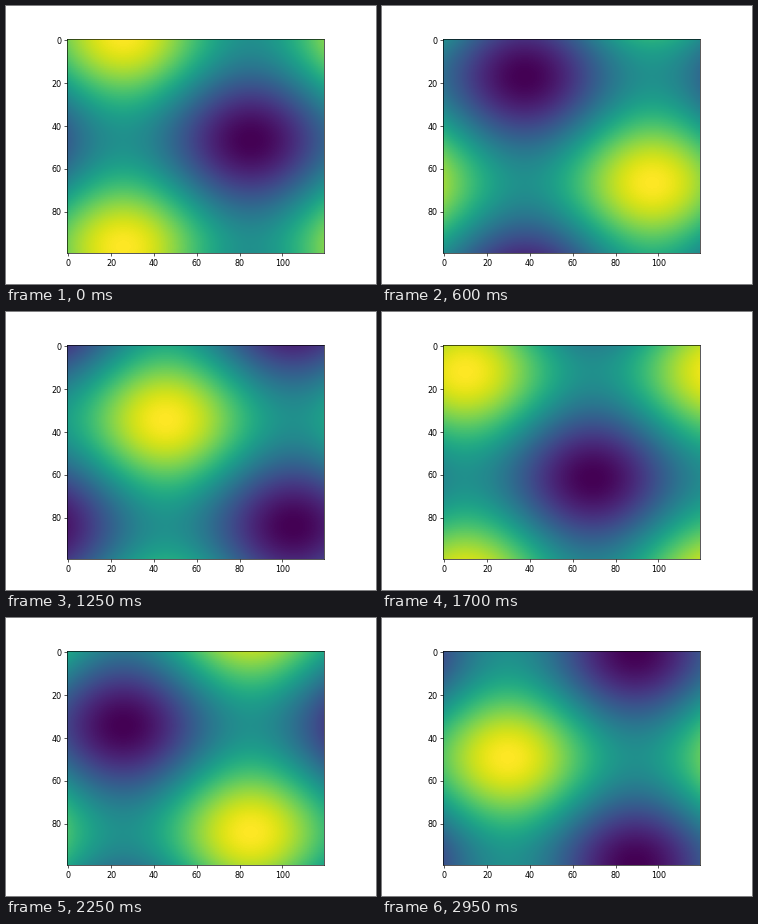
A matplotlib script for the animation above (3 s loop, 370x278 px).

```python
import numpy as np
import matplotlib.pyplot as plt
from matplotlib.animation import FuncAnimation

FRAMES = 60
INTERVAL = 50  # ms

X = np.linspace(0, 2 * np.pi, 120)
Y = np.linspace(0, 2 * np.pi, 100).reshape(-1, 1)


def wave(i):
    """Sum of two waves, each sliding at its own speed."""
    step = i + 1
    return np.sin(X + step * np.pi / 15) + np.cos(Y + step * np.pi / 20)


# 370 x 278 pixels
fig, ax = plt.subplots(figsize=(6.4, 4.80865), dpi=57.8125)
image = ax.imshow(wave(0), cmap="viridis")


def update(i):
    image.set_data(wave(i))
    image.autoscale()
    return [image]


anim = FuncAnimation(fig, update, frames=FRAMES, interval=INTERVAL,
                     init_func=lambda: update(0), repeat=True,
                     repeat_delay=0, blit=False)

plt.show()
```
